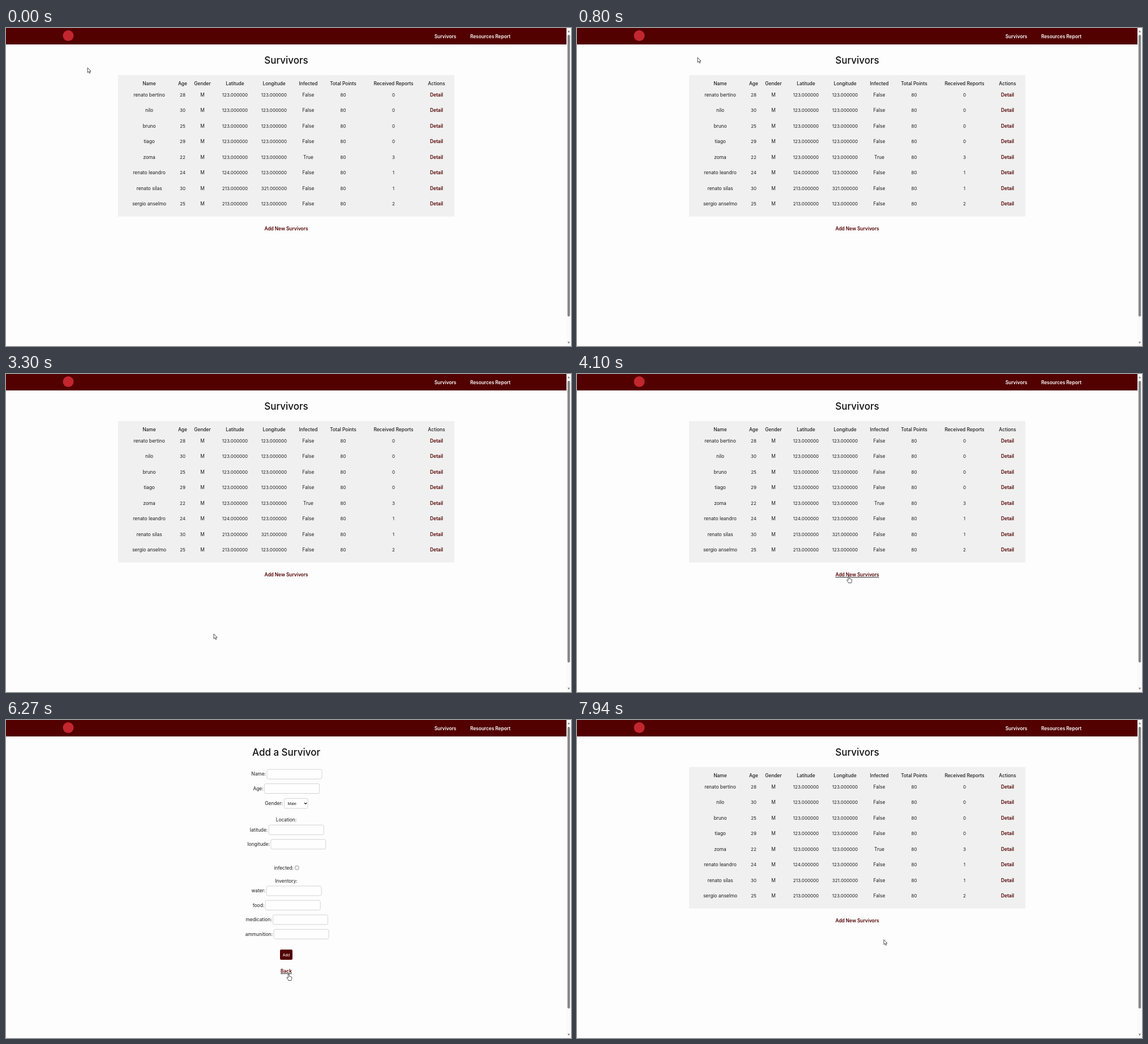
An HTML page for the animation above (8 s loop, 998x561 px).

```html
<!DOCTYPE html>
<html lang="en">
<head>
<meta charset="utf-8">
<title>Survivors</title>
<style>
  html, body { margin: 0; width: 100%; height: 100%; overflow: hidden; background: #fdfdfd; }
  svg { display: block; width: 998px; height: 561px; }
  text { font: 8.4px Inter, "Open Sans", sans-serif; fill: #1c1c1c; text-anchor: middle; }
  .title { font-size: 17px; font-weight: 500; fill: #111; }
  .head { font-size: 8.4px; font-weight: 500; }
  .num { font-size: 8px; }
  .link { font-size: 8.3px; font-weight: 600; fill: #520000; }
  .nav { font-size: 8.3px; font-weight: 600; fill: #fff; }
  .label { text-anchor: end; }
  .ui { font: 7.1px "Liberation Sans", Arial, sans-serif; }
  .field { fill: #fefefe; stroke: #c9c9c9; stroke-width: .8; }
  .hover { text-decoration: underline; }
  .cursor { fill: #fff; stroke: #222; stroke-width: .8; stroke-linejoin: round; }
</style>
</head>
<body>
<svg viewBox="0 0 998 561">
  <rect width="990" height="29" fill="#520000"/>
  <circle cx="110" cy="13.5" r="9.5" fill="#c3262e"/>
  <text class="nav" x="776" y="18">Survivors</text>
  <text class="nav" x="855.5" y="18">Resources Report</text>
  <rect x="990" width="8" height="561" fill="#fafafa"/>
  <rect x="991.8" y="12" width="4.4" height="497" rx="2.2" fill="#868686"/>
  <path d="M991.8 7.5h4.4L994 4zM991.8 553.5h4.4L994 557z" fill="#868686"/>
  <g id="list"></g>
  <g id="form"></g>
  <g class="cursor">
    <path id="arrow" d="M0 0V8.6L2 6.8 3.4 9.9 4.8 9.3 3.5 6.3H6z"/>
    <path id="hand" d="M-1 1a1 1 0 0 1 2 0V4.3q.9-.5 1.6.2.9-.4 1.5.4 1.3-.2 1.3 1.2V8.3q0 1.5-1 3.2H-.4Q-1.2 9.6-2.8 7.8-3.7 6.5-2.6 6q.8-.1 1.6 1z"/>
    <path id="beam" d="M-2-4.5H2M0-4.5V4.5M-2 4.5H2" fill="none"/>
  </g>
</svg>
<script>
const $ = id => document.getElementById(id);
const text = (x, y, str, cls = '') => `<text x="${x}" y="${y}" class="${cls}">${str}</text>`;
const box = (x, y, w, h, attrs) => `<rect x="${x}" y="${y}" width="${w}" height="${h}" ${attrs}/>`;
const field = (x, y, w, h) => box(x, y, w, h, 'rx="2.5" class="field"');

const columns = [253, 312, 347, 404.5, 473.5, 534, 595.5, 684.5, 760.5];
const heads = ['Name', 'Age', 'Gender', 'Latitude', 'Longitude', 'Infected',
  'Total Points', 'Received Reports', 'Actions'];
// name, age, latitude, longitude, reports
const people = [
  ['renato bertino', 28, 123, 123, 0],
  ['nilo', 30, 123, 123, 0],
  ['bruno', 25, 123, 123, 0],
  ['tiago', 29, 123, 123, 0],
  ['zoma', 22, 123, 123, 3],
  ['renato leandro', 24, 124, 123, 1],
  ['renato silas', 30, 213, 321, 1],
  ['sergio anselmo', 25, 213, 123, 2]
];

function row([name, age, lat, lon, reports], i) {
  const cells = [name, age, 'M', lat.toFixed(6), lon.toFixed(6),
    reports > 2 ? 'True' : 'False', 80, reports, 'Detail'];
  return cells.map((cell, c) => text(columns[c], 120.6 + 27.5 * i, cell,
    c === 8 ? 'link' : /^\d/.test(cell) ? 'num' : '')).join('');
}

$('list').innerHTML = text(495, 62.5, 'Survivors', 'title')
  + box(198, 83, 594, 249.5, 'fill="#f0f0f0"')
  + heads.map((h, c) => text(columns[c], 101, h, 'head')).join('')
  + people.map(row).join('')
  + '<g id="add">' + text(495, 357.3, 'Add New Survivors', 'link') + '</g>';

// label, field left, centre y
const inputs = [
  ['Name', 461, 95.6], ['Age', 456.6, 121], ['latitude', 464.3, 193.8], ['longitude', 467.8, 219.2],
  ['water', 460.2, 301.4], ['food', 458.2, 326.8], ['medication', 471.6, 352.3], ['ammunition', 473.2, 377.8]
];

$('form').innerHTML = text(495, 62.5, 'Add a Survivor', 'title')
  + inputs.map(([name, x, y]) => text(x - 2, y + 2.7, name + ':', 'label') + field(x, y - 8.5, 97, 17)).join('')
  + text(489, 149.7, 'Gender:', 'label') + field(491.4, 138.4, 41.8, 17.6)
  + text(505.2, 149.8, 'Male', 'ui')
  + '<path d="M527 146l2.2 2.2 2.2-2.2" fill="none" stroke="#111" stroke-width="1.1"/>'
  + text(495, 179, 'Location:')
  + text(508, 263.8, 'infected:', 'label')
  + box(510.8, 257.6, 6.2, 6.2, 'rx="1.2" fill="#fff" stroke="#767676" stroke-width=".8"')
  + text(495, 286.8, 'Inventory:')
  + box(484, 405, 22, 18, 'rx="2" fill="#520000"')
  + text(495, 416.5, 'Add', 'ui" style="fill:#fff')
  + '<g id="back">' + text(495, 446.2, 'Back', 'link') + '</g>';

// time, x, y; equal times make a jump
const path = [
  [0, 144, 70], [30, 144, 70], [160, 160, 66], [360, 160, 66], [800, 213, 52],
  [2770, 213, 52], [2770, 232.5, 379.5], [3030, 313.5, 503.5],
  [3300, 313.5, 503.5], [3300, 367, 458.5], [3730, 367, 458.5], [3930, 478, 354],
  [4070, 478, 354], [4100, 480, 357], [5340, 480, 357], [5370, 490, 364],
  [5840, 490, 364], [6040, 508, 430], [6240, 508, 430], [6270, 499.3, 448],
  [7900, 499.3, 448], [7940, 542, 387.5], [8000, 542, 387.5]
];

function position(t) {
  const i = path.findIndex(p => p[0] > t);
  const [t0, x0, y0] = path[i - 1], [t1, x1, y1] = path[i];
  const k = (t - t0) / (t1 - t0);
  return [x0 + (x1 - x0) * k, y0 + (y1 - y0) * k];
}

const within = (t, from, to) => t >= from && t < to;

function draw(now) {
  const t = now % 8000;
  const onForm = within(t, 5040, 7170);
  const shape = within(t, 3900, 5340) || within(t, 6240, 7900) ? 'hand'
    : within(t, 5340, 5900) ? 'beam' : 'arrow';
  $('list').style.display = onForm ? 'none' : '';
  $('form').style.display = onForm ? '' : 'none';
  $('add').classList.toggle('hover', within(t, 3900, 5040));
  $('back').classList.toggle('hover', within(t, 6240, 7170));
  for (const id of ['arrow', 'hand', 'beam']) $(id).style.display = id === shape ? '' : 'none';
  $(shape).setAttribute('transform', `translate(${position(t)})`);
}

const start = performance.now();
function tick() {
  draw(performance.now() - start);
  requestAnimationFrame(tick);
}
tick();
</script>
</body>
</html>
```
